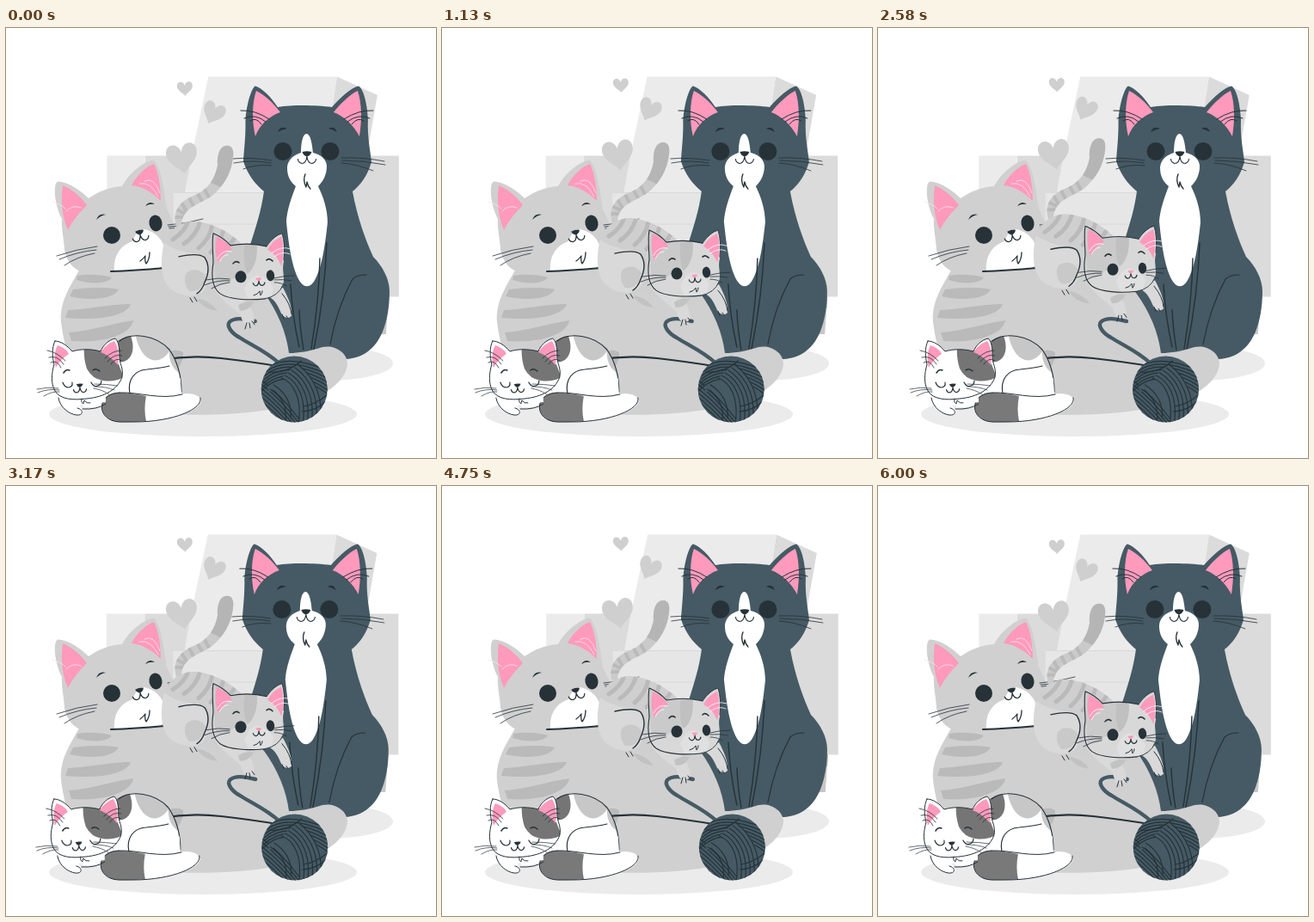
An HTML page with a canvas for the animation above (6.04 s loop, 500x500 px).

```html
<!DOCTYPE html>
<html lang="en">
<head>
<meta charset="utf-8">
<title>Cat family</title>
<style>
html, body { margin: 0; width: 100%; height: 100%; overflow: hidden; background: #fff; }
canvas { display: block; width: 100vw; height: 100vh; }
</style>
</head>
<body>
<canvas id="stage"></canvas>
<script>
const canvas = document.getElementById('stage');
const g = canvas.getContext('2d');
const INK = '#263238', SLATE = '#455a64', PINK = '#ff9abc', WHITE = '#fff';
const FUR = '#d0d0d0', STRIPE = '#bababa', PATCH = '#757575';
const LOOP = 6040, FPS = 24;

const fill = (color, d) => { g.fillStyle = color; g.fill(new Path2D(d)); };
const line = (d, w = 1, color = INK) => {
  g.strokeStyle = color; g.lineWidth = w;
  g.stroke(new Path2D(d));
};
const oval = (color, x, y, rx, ry = rx, rot = 0) => {
  g.fillStyle = color;
  g.beginPath(); g.ellipse(x, y, rx, ry, rot, 0, Math.PI * 2); g.fill();
};
const clipped = (d, draw) => {
  g.save(); g.clip(new Path2D(d)); draw(); g.restore();
};
const moved = (x, y, draw) => {
  g.save(); g.translate(x, y); draw(); g.restore();
};

const STEPS = [0, -1, 2, -4, 4, -4, 4, -4, 2, -1, 0];
function shake(t, period) {
  const p = (t / period % 1) * 10, i = Math.floor(p);
  return STEPS[i] + (STEPS[i + 1] - STEPS[i]) * (p - i);
}
const bob = (t, period) => -10 * (1 - Math.abs(1 - 2 * (t / period % 1)));

// Nose tip at (x, y); the mouth is a W of the given half width.
function muzzle(x, y, size, rot, nose = INK) {
  g.save();
  g.translate(x, y); g.rotate(rot); g.scale(size, size);
  fill(nose, 'M-5.500 -5.500Q0 -7 5.500 -5.500Q4 -1 0 0Q-4 -1 -5.500 -5.500Z');
  line('M0 0Q-1 8 -6 8Q-10 7 -10.500 3M0 0Q1 8 6 8Q10 7 10.500 3', 1.200 / size);
  g.restore();
}

function chair() {
  fill('#c7c7c7', 'M430 312H445L442 356H428Z');
  fill('#adadad', 'M430 312H445L444.400 326H430Z');
  fill('#dbdbdb', 'M385 56.500L432 78L419 152H370Z');
  fill('#dbdbdb', 'M162 148.500H457V312.500H162Z');
  fill('#ebebeb', 'M117.500 148.500H162V312H117.500Z');
  fill('#ebebeb', 'M235.500 56.500H385L366 192H208L216 148Z');
  fill('#e6e6e6', 'M195 192H372V312H195Z');
  line('M208 191.500H370M204 228H370', 1, '#d8d8d8');
}

function heart(x, y, w, h, rot) {
  g.save();
  g.translate(x, y); g.rotate(rot); g.scale(w, h);
  fill('#cfcfcf', 'M0 1C-.25 .6 -1 .25 -1 -.38C-1 -1.050 -.2 -1.150 0 -.42C.2 -1.150 1 -1.050 1 -.38C1 .25 .25 .6 0 1Z');
  g.restore();
}
function hearts() {
  heart(208, 71, 9, 8.500, -.05);
  heart(241, 99.500, 13, 13.500, .42);
  heart(205, 152, 18, 18, -.16);
}

function tuxedo() {
  fill(SLATE, 'M290 67.500C286 69 280 87 278.500 107C279 125 277 140 276 155C281 170 289 181 300 190C297 212 291 230 286 246C272 280 285 340 325 378C335 384 360 384 395 385C416 384 430 372 438 353C443 341 446 325 446 306C446 292 438 277 427 266C418 246 409 222 403 190C413 182 420 172 425 156C424 144 420 128 421 106C420 88 416 71 410 67.500C402 69 390 80 379 92C362 90 335 89 316 92C309 81 298 70 290 67.500Z');
  fill(PINK, 'M291 73C286 88 286 108 290 126C295 113 305 103 319 98C311 87 301 78 291 73Z');
  fill(PINK, 'M409 73C399 78 389 88 381 98C394 103 404 113 411 126C414 108 414 88 409 73Z');
  line('M273 96Q290 95 306 106M277 105Q290 99 302 109M284 108Q291 103 297 112', 1);
  line('M427 96Q410 95 393 106M423 105Q410 99 397 109M416 108Q409 103 402 112', 1);

  fill(WHITE, 'M349.500 123C354 123 356 134 357 145C366 147 374 153 373 163C372 174 367 180 363 184C369 196 374 211 374 226C371 254 367 281 358 295C353 302 347 302 342 295C333 281 329 254 326 225C327 211 332 197 337 184C331 179 327 173 327 162C328 153 334 148 343 145C343 134 345 123 349.500 123Z');
  oval(INK, 322, 143.500, 10.500); oval(INK, 377, 143.500, 10.500);
  muzzle(350, 149.500, 1, 0);
  line('M348 170Q345 177 349 185L350 179Q351 184 354 187', 1.400);
  fill(INK, 'M316 121Q319 113 327 117Q321 118 316 121Z');
  fill(INK, 'M385 121Q382 113 375 117Q380 118 385 121Z');
  line('M264 152Q285 150 309 154M265 157Q286 153 308 157M276 164Q290 158 309 160', .8);
  line('M390 151Q415 150 440 155M391 154Q415 154 441 159M390 157Q408 158 427 166', .8);

  line('M331 298Q333 335 341 371M341 328Q342 350 346 374M365 268Q364 318 355 373M373 250Q371 310 358 374', 1.400);
  line('M419 287Q408 287 403 292Q385 325 377 368', 1.200);
}

function bigCat() {
  fill(FUR, 'M86 280C75 300 62 318 64 342C69 380 82 430 150 445C215 454 300 450 350 434C375 425 397 408 397 389C396 377 382 368 368 371C352 376 341 378 329 378C326 354 316 330 300 308C275 285 230 272 183 278Z');
  fill(STRIPE, 'M83 288C94 286 110 286 123 290C119 297 101 299 82 293Z');
  fill(STRIPE, 'M78 304C95 302 116 301 131 304C126 315 98 318 74 312Z');
  fill(STRIPE, 'M72 328C96 327 120 321 145 321C141 334 111 341 69 337Z');
  fill(STRIPE, 'M73 354C95 353 126 343 148 340C146 355 117 367 76 364Z');
  fill(STRIPE, 'M190 376Q199 373 206 377Q207 386 200 396Q193 388 190 376Z');
  line('M180 386Q215 380 250 384Q285 388 315 393', 2.200);

  fill(FUR, 'M60 178.500C54 182 57 207 65 222C64 233 68 249 68 258C71 274 82 286 100 285C129 285 160 285 185 279C207 263 201 236 187 211C184 192 181 163 172 153.500C160 155 143 169 135 184C120 185 108 190 96 198C86 188 70 178 60 178.500Z');
  fill(PINK, 'M66 183C76 187 86 195 94 206C86 214 78 223 72 235C64 216 64 198 66 183Z');
  fill(PINK, 'M172 158C163 161 152 171 146 183C158 184 170 191 180 201C180 183 177 168 172 158Z');
  line('M70 213Q77 205 87 209M54 202Q64 205 69 210', .8, '#ffe3ec');
  line('M155 181Q168 178 177 196M161 178Q172 172 179 192', .8, '#ffe3ec');
  fill(WHITE, 'M126 283C125 266 131 254 147 248C150 241 154 233 161 234C174 237 185 247 185 263C185 271 182 278 178 280Z');
  line('M122 283Q150 282 184 279', 2);
  oval(INK, 123, 241, 10); oval(INK, 174, 227, 7.500, 9.500, -.2);
  muzzle(156, 240.500, .9, -.2);
  line('M156 271Q160 268 162 265Q161 271 163 274Q167 269 167 261', 1.300);
  fill(INK, 'M105 223Q108 215 116 217Q110 218 105 223Z');
  fill(INK, 'M162 207Q167 200 173 205Q167 204 162 207Z');
  line('M59 265Q82 257 106 254M62 269Q83 260 105 258M68 276Q82 266 103 262', .8);
  line('M188 229Q208 228 229 222M189 231Q209 229 226 229M190 233Q205 231 218 233', .8);
}

const TAIL = 'M198 231C192 211 205 200 221 194C236 187 243 175 246 160C245 147 249 137 257 137C264 137 265 144 264 151C262 169 253 184 240 195C225 206 204 208 204 231Z';
const BACK = 'M184 248C190 235 201 226 218 225C237 226 257 235 273 250L300 320C265 325 235 312 205 304C185 292 180 268 184 248Z';
const HEAD = 'M241 239C240 247 240 258 242 272C239 286 239 298 247 307C258 317 281 317 301 315C314 312 323 304 323 293C323 284 321 280 323 272C324 260 324 248 321 239C315 241 307 247 303 254C289 251 274 250 262 254C257 246 250 241 241 239Z';

function kitten() {
  fill('#cacaca', TAIL);
  clipped(TAIL, () => {
    fill('#b5b5b5', 'M230 176L257 189L275 130H238Z');
    line('M229 184L239 203M220 188L231 207M211 194L220 211M202 200L211 215M192 208L210 217M190 220H210', 4, STRIPE);
  });
  fill('#cfcfcf', BACK);
  clipped(BACK, () => line('M212 224Q209 236 194 246M226 224Q222 241 207 251M240 229Q237 245 224 256M253 235Q249 251 238 261M266 244Q260 254 247 264', 5, STRIPE));
  fill('#d9d9d9', 'M184 250C178 273 180 297 195 306C207 313 223 315 231 304C238 292 236 270 228 264C218 261 202 263 184 250Z');
  fill('#c9c9c9', 'M210 285C217 279 228 281 232 289C231 300 223 308 213 306C208 301 206 291 210 285Z');
  line('M201 266Q224 261 231 267Q239 279 231 296Q228 305 222 309', 1.400);
  line('M214 314L217 319M219 313L222 318', 1);
  fill('#c2c2c2', 'M222 315Q236 316 246 329Q230 328 222 315Z');

  fill('#d9d9d9', 'M242 304C250 317 264 326 273 334Q275 346 282 346Q291 345 288 335C285 322 276 313 266 309Z');
  fill('#c2c2c2', 'M270 323Q277 317 288 319Q283 329 272 329Z');
  fill('#d9d9d9', 'M304 312C314 316 317 326 321 334Q327 340 332 335C333 326 329 315 322 302Z');
  line('M280 343L278 350M283 343L284 349M286 341L289 345', 1);
  line('M321 309Q331 321 332 333M321 333L323 338M326 335L328 338', 1);

  fill('#d8d8d8', HEAD);
  clipped(HEAD, () => {
    fill('#cacaca', 'M238 238H291C294 264 289 280 281 286C267 284 258 301 244 300Z');
    fill('#c0c0c0', 'M278 248H291C294 266 289 280 281 286C276 278 276 260 278 248Z');
    fill('#e0e0e0', 'M277 304Q284 288 293 288Q307 292 311 302L307 318H283Z');
  });
  fill(PINK, 'M245 243C252 246 259 251 263 258C255 261 250 267 247 274C243 264 243 252 245 243Z');
  fill(PINK, 'M320 243C313 246 308 251 304 258C311 262 317 268 320 277C323 266 323 252 320 243Z');
  line('M241 239C239 250 241 264 241 273C238 292 241 303 249 309C259 316 282 317 301 315M241 239Q253 244 261 253Q283 249 303 254', 1.100);
  line('M303 254Q312 241 321 239Q325 251 323 270M301 315Q317 312 322 299', .9);
  line('M246 268Q252 257 262 260M248 272Q253 263 258 264M309 262Q319 253 331 257M312 266Q321 259 330 263', .8, WHITE);
  oval(INK, 273, 289.500, 6.500, 7); oval(INK, 307.500, 288, 4.700, 6.500, -.1);
  muzzle(294, 294.500, .65, -.05, PINK);
  line('M288 311Q293 310 295 306L296 311Q298 309 298 306', 1);
  line('M264 274Q267 270 271 273M303 270Q306 267 310 271', 1.600);
  line('M231 299Q246 293 260 294M233 293Q247 290 260 292M239 303Q249 297 260 296', .8);
  line('M312 291Q324 288 335 288M312 293Q323 292 332 294M312 296Q320 296 326 300', .8);
}

function strand() {
  line('M318 390C303 376 286 369 272 360C261 354 257 346 260 342C266 336 277 338 290 341', 4.400, SLATE);
}

function ball() {
  g.save();
  g.translate(335.500, 420);
  oval(SLATE, 0, 0, 38.500);
  g.beginPath(); g.arc(0, 0, 38.500, 0, Math.PI * 2); g.clip();
  for (let i = 0; i < 9; i++) {
    const k = i * 5;
    line(`M-40 ${-12 + k}Q-16 ${6 + k} 5 ${34 + k}`, 1.200);
  }
  fill(SLATE, 'M-32 -25Q0 -45 36 -17L40 4Q2 -20 -30 4Z');
  for (let i = 0; i < 7; i++) {
    const k = i * 4.500;
    line(`M${-38 + i} ${2 - k}Q-8 ${-28 - k * .5} 38 ${5 - k}`, 1.200);
  }
  fill(SLATE, 'M-15 -13C-1 -8 8 12 7 39L34 28C32 2 20 -19 2 -28Z');
  for (let i = 0; i < 6; i++) {
    const k = i * 5;
    line(`M${-15 + i * 4} ${-13 - i * 3}C${-1 + k} ${-8 - i} ${9 + k} 10 ${5 + k} 39`, 1.200);
  }
  line('M-24 -5Q-3 8 -4 33M-28 0Q-8 12 -10 35M10 20Q25 18 39 6M9 26Q26 25 37 14M-30 -20Q-8 -18 8 -33', 1.200);
  g.restore();
}

const BODY = 'M130 364C146 352 175 357 190 374C199 387 204 402 203 425L165 441H90V390Z';
const FACE = 'M57 364C53 372 54 383 56 391C53 402 52 413 57 422C63 432 78 433 94 431C115 429 130 420 135 406C137 395 132 391 132 382C132 372 131 364 127 361C119 363 113 369 110 376C99 373 87 373 77 376C71 369 64 364 57 364Z';
function calico() {
  fill(WHITE, BODY);
  clipped(BODY, () => {
    fill('#c7c7c7', 'M150 354C168 354 183 362 191 374C187 382 179 388 170 386C160 383 153 371 150 354ZM190 374C197 382 202 392 203 402C194 397 189 387 190 374Z');
    fill(PATCH, 'M126 364L144 356C150 368 149 384 137 388L126 389Z');
  });
  line('M132 364C146 353 175 357 190 374C199 387 204 402 204 423', 1.200);
  fill(WHITE, 'M143 426C141 407 151 397 165 397C184 395 198 399 203 408L204 426Z');
  line('M144 425C141 408 150 398 164 397Q183 395 190 393', 1.200);
  fill(WHITE, 'M204 426C215 423 228 428 227 434C224 446 192 458 150 458H130C105 458 105 424 130 424C155 423 177 432 204 426Z');
  fill('#797979', 'M163 428C161 438 161 448 163 457Q145 459 130 458C105 455 106 425 130 424Q146 424 163 428Z');
  line('M132 424C155 423 179 433 205 426M226 430C230 443 194 458 150 458H132C105 457 104 425 132 424', 1);

  fill(WHITE, 'M61 429C62 440 70 447 80 450Q92 451 89 443L85 439L116 435V418Z');
  line('M61 430C63 442 74 449 82 450C91 451 90 443 83 442M89 443Q106 444 116 437', 1);
  fill(WHITE, FACE);
  clipped(FACE, () => fill(PATCH, 'M91 372L111 375Q122 382 131 391L137 406Q126 412 113 410Q100 408 94 396Q90 383 91 372Z'));
  line(FACE, 1);
  fill(PINK, 'M60 369C66 371 71 374 73 379C67 383 62 388 58 395C56 386 56 376 60 369Z');
  fill(PINK, 'M126 364C120 366 114 371 110 377C118 380 126 386 130 392C132 382 131 371 126 364Z');
  line('M48 375Q60 377 69 387M50 383Q60 380 67 391M52 389Q59 385 64 395', .8);
  line('M134 375Q124 375 115 384M135 381Q126 378 118 388M135 387Q128 382 122 391', .8);
  line('M66 412Q68 418 73 418Q78 417 77 412M99 412Q102 418 107 416Q111 415 111 410', 1.200);
  line('M67 401Q70 396 74 398M101 398Q105 395 109 399', 1.500);
  muzzle(86, 418, .72, -.05);
  line('M88 431Q87 435 90 437L91 433Q94 437 98 436', 1);
  line('M36 420Q48 417 61 419M37 424Q49 419 62 421M44 428Q54 422 62 423', .7);
  line('M103 414Q117 414 130 416M103 417Q117 417 126 421M102 419Q113 421 120 426', .7);
}

function scene(t) {
  oval('#ebebeb', 370, 390, 80, 20);
  oval('#ebebeb', 229, 449, 179, 26);
  const slow = shake(t, 6), quick = shake(t, 1.5);
  moved(shake(t, 3), 0, chair);
  moved(0, bob(t, 1.5), hearts);
  moved(slow, 0, tuxedo);
  bigCat();
  moved(quick, 0, strand);
  moved(0, bob(t, 6), kitten);
  moved(quick, 0, ball);
  moved(slow, 0, calico);
}

function frame(now) {
  const dpr = window.devicePixelRatio || 1;
  const w = Math.round(innerWidth * dpr), h = Math.round(innerHeight * dpr);
  if (canvas.width !== w || canvas.height !== h) { canvas.width = w; canvas.height = h; }
  g.setTransform(w / 500, 0, 0, h / 500, 0, 0);
  g.lineCap = g.lineJoin = 'round';
  g.fillStyle = WHITE;
  g.fillRect(0, 0, 500, 500);
  const step = Math.floor((now % LOOP + 5) * FPS / 1000) + 1;
  scene(step / FPS);
  requestAnimationFrame(frame);
}
frame(0);
</script>
</body>
</html>
```
